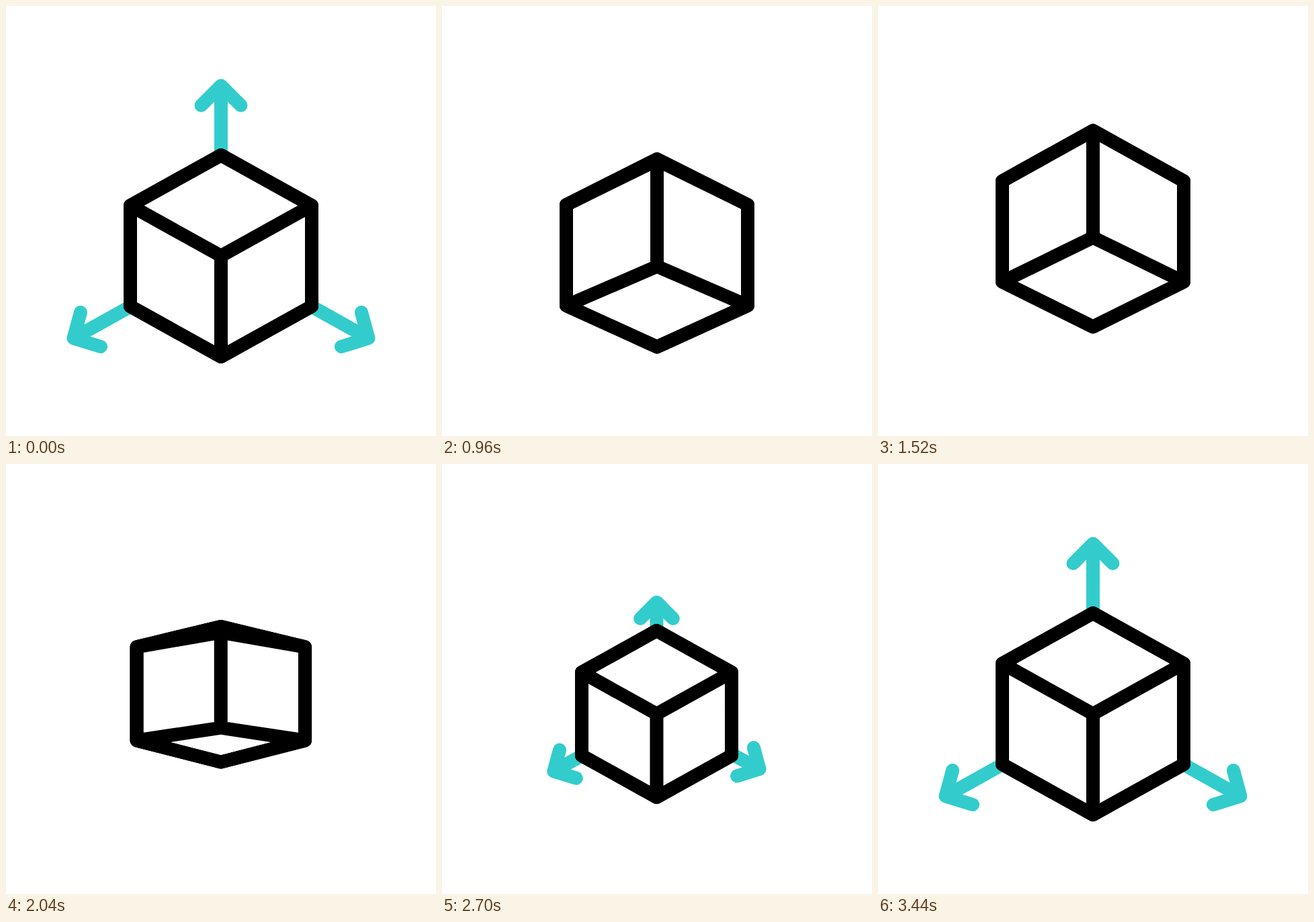
These frames come from a looping animation (640 px wide and 640 px high, 3.6 s). An HTML page:

```html
<!DOCTYPE html>
<html lang="en">
<head>
<meta charset="utf-8">
<title>Cube with axes</title>
<style>
  html, body { margin: 0; width: 100%; height: 100%; overflow: hidden; background: #fff; }
  svg { display: block; width: 100vw; height: 100vh; }
  path { fill: none; stroke: #000; stroke-width: 20; stroke-linecap: round; stroke-linejoin: round; }
  #axes { stroke: #33cccc; }
  #body { fill: #fff; }
</style>
</head>
<body>
<svg viewBox="0 0 640 640">
  <path id="axes"/>
  <path id="body"/>
  <path id="cube"/>
</svg>
<script>
const LOOP = 3600, STEP = 20, BEAT = 400;
const W = 135, H = 75;      // half width and half height of a side
const HOP = 46, SHRINK = 0.174, TUCK = 1.7;

const ramp = (t, from, to) => Math.min(1, Math.max(0, (t - from) / (to - from)));
const smooth = u => (1 - Math.cos(Math.PI * u)) / 2;
const easeOut = (u, power) => 1 - (1 - u) ** power;
const bump = u => Math.sin(Math.PI * u) ** 2;
const mix = (a, b, u) => a + (b - a) * u;

// 0: seen from above, 1: level, 2: seen from below
const turn = t => 2 * (ramp(t, 200, 200 + 2 * BEAT) - ramp(t, 1800, 1800 + 2 * BEAT));

// Three hops in a row
const lift = t => -HOP * bump(3 * ramp(t, 200, 200 + 6 * BEAT));

const size = t => 1 - SHRINK * (easeOut(ramp(t, 1800, 2600), 1.5) - smooth(ramp(t, 2900, 3440)));

// 1: arrows fully out, 0: tips at the cube corners, below 0: behind the cube
const reach = t => 1
  - TUCK * smooth(ramp(t, 310, 560))
  + 1.5 * bump(ramp(t, 2060, 2330))
  + TUCK * easeOut(ramp(t, 2330, 3440), 3);

const setPath = (id, d) => document.getElementById(id).setAttribute('d', d);

function draw(t) {
  const s = size(t), k = turn(t), p = reach(t);
  const cx = 320 - 3 * (1 - s), cy = 372 + lift(t);
  const pt = ([x, y]) => `${(cx + s * x).toFixed(2)} ${(cy + s * y).toFixed(2)}`;
  const line = (...points) => 'M' + points.map(pt).join('L');

  // A middle corner moves through three heights, relative to the side corners.
  const corner = (base, above, level, below) =>
    [0, base + (k < 1 ? mix(above, level, k) : mix(level, below, k - 1))];
  const back = corner(-H, -H, -4.5, -H);
  const front = corner(-H, H, 11, -H);
  const foot = corner(H, H, 10, -66);
  const under = corner(H, H, 13, 67);
  const l = [-W, -H], r = [W, -H], lb = [-W, H], rb = [W, H];

  setPath('body', line(back, r, rb, under, lb, l) + 'Z');
  setPath('cube',
    line(back, r, front, l) + 'Z' +
    line(foot, rb, under, lb) + 'Z' +
    line(l, lb) + line(r, rb) + line(front, foot));

  const arrow = ([x, y], [ax, ay], [bx, by]) =>
    line([0, 0], [x, y]) + line([x + ax, y + ay], [x, y], [x + bx, y + by]);
  const q = p * (1.4 - 0.4 * Math.abs(p));   // side arrows lead a little
  const side = (dir, rise) =>
    arrow([dir * (W + 84.5 * q), H + 47.5 * q - rise], [-dir * 10.5, -38.5], [-dir * 40.5, 12.5]);
  const out = p > 1 - TUCK + 0.01;
  setPath('axes', out
    ? arrow([0, -2 * H - 103.5 * p], [-29.5, 29.5], [29.5, 29.5]) + side(-1, 0) + side(1, 8 * (1 - p))
    : '');
}

const start = performance.now();
function tick() {
  const t = (performance.now() - start) % LOOP;
  draw(Math.floor(t / STEP) * STEP);
  requestAnimationFrame(tick);
}
tick();
</script>
</body>
</html>
```
